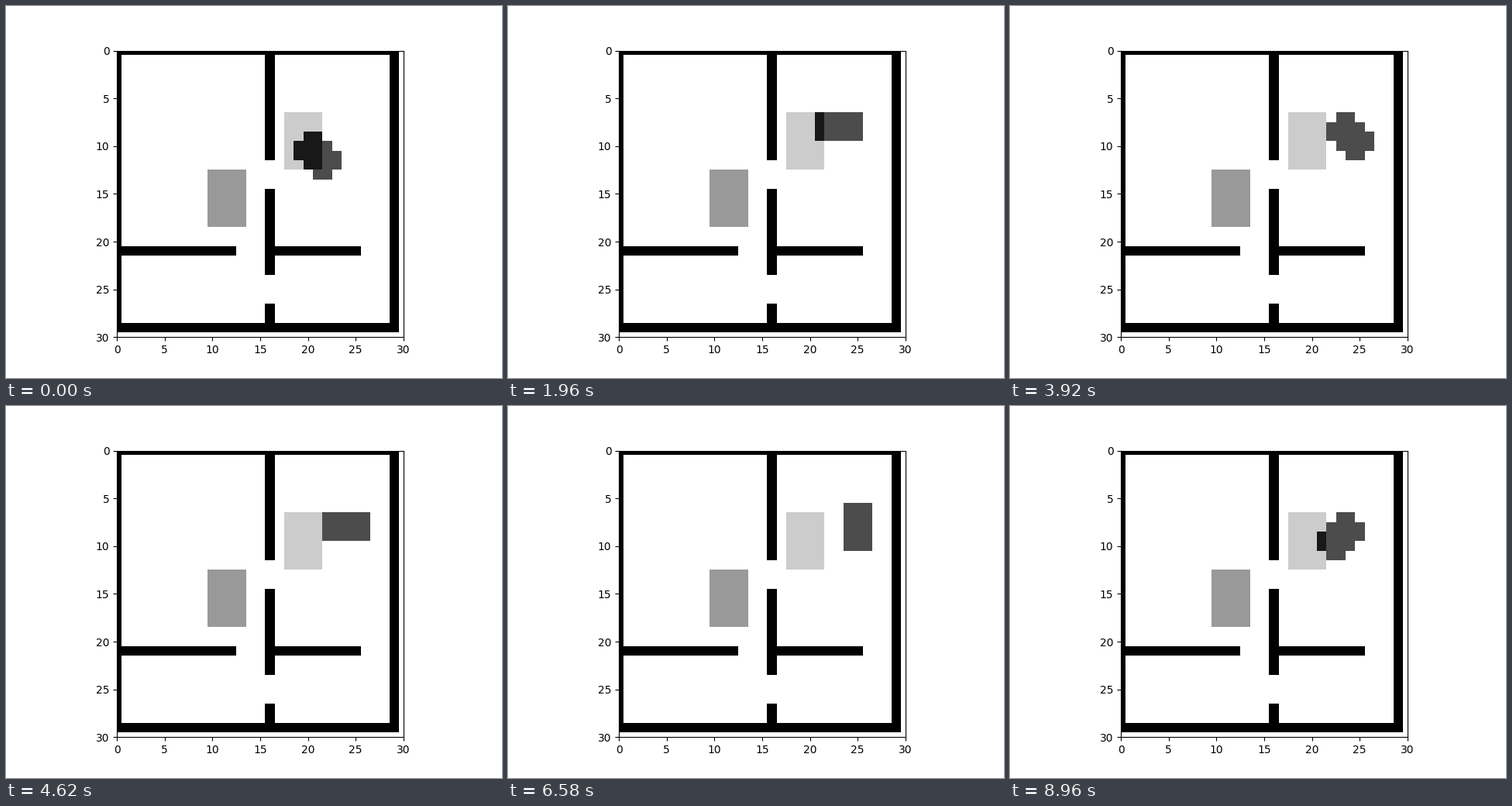
Write a matplotlib script that moves like this. It is 640 px wide and 480 px high and loops after 9100 ms.

```python
import numpy as np
import matplotlib.pyplot as plt
from matplotlib.animation import FuncAnimation

SIZE = 30
FRAMES, STEP_MS = 65, 140

# Key poses: step, column, row, heading in eighths of a turn.
# The block turns about one eighth per step and drifts between them.
KEYS = np.array([
    (1, 21, 11, 1), (7, 27, 8, 8), (17, 21, 8, 17), (21, 25, 6, 21),
    (28, 24, 9, 29), (38, 25, 8, 39), (41, 19, 9, 41), (47, 25, 8, 48),
    (49, 26, 7, 49), (57, 20, 10, 57), (59, 24, 10, 59), (60, 24, 10, 59),
    (62, 21, 8, 61), (64, 23, 9, 63),
]).T


def build_room():
    room = np.zeros((SIZE, SIZE))
    room[7:13, 18:22] = 0.2
    room[13:19, 10:14] = 0.4
    room[[0, -1], :] = 1
    room[:, [0, -1]] = 1
    room[21, :26] = 1
    room[21, 13:16] = 0
    room[:, 16] = 1
    for gap in (12, 24):
        room[gap:gap + 3, 16] = 0
    return room


def pose(step):
    return [round(float(np.interp(step, KEYS[0], values)))
            for values in KEYS[1:]]


def body(x, y, heading):
    """Cells covered by a 3 x 5 block turned to the given heading."""
    rows, cols = np.indices((SIZE, SIZE))
    dx, dy = cols - x, rows - y
    s, c = np.sin(heading * np.pi / 4), np.cos(heading * np.pi / 4)
    along = dx * s + dy * c
    across = dx * c - dy * s
    return (np.abs(along) < 2.2) & (np.abs(across) < 1.45)


ROOM = build_room()


def grid(step):
    return np.clip(ROOM + 0.7 * body(*pose(step)), 0, 1)


fig, ax = plt.subplots(figsize=(6.4, 4.8), dpi=100)
image = ax.imshow(grid(0), cmap="gray_r", vmin=0, vmax=1)
ax.set_xlim(0, SIZE)
ax.set_ylim(SIZE, 0)
ax.set_xticks(range(0, SIZE + 1, 5))
ax.set_yticks(range(0, SIZE + 1, 5))


def update(step):
    image.set_data(grid(step))
    return [image]


anim = FuncAnimation(fig, update, frames=FRAMES, interval=STEP_MS,
                     repeat=True, repeat_delay=0)
plt.show()
```
